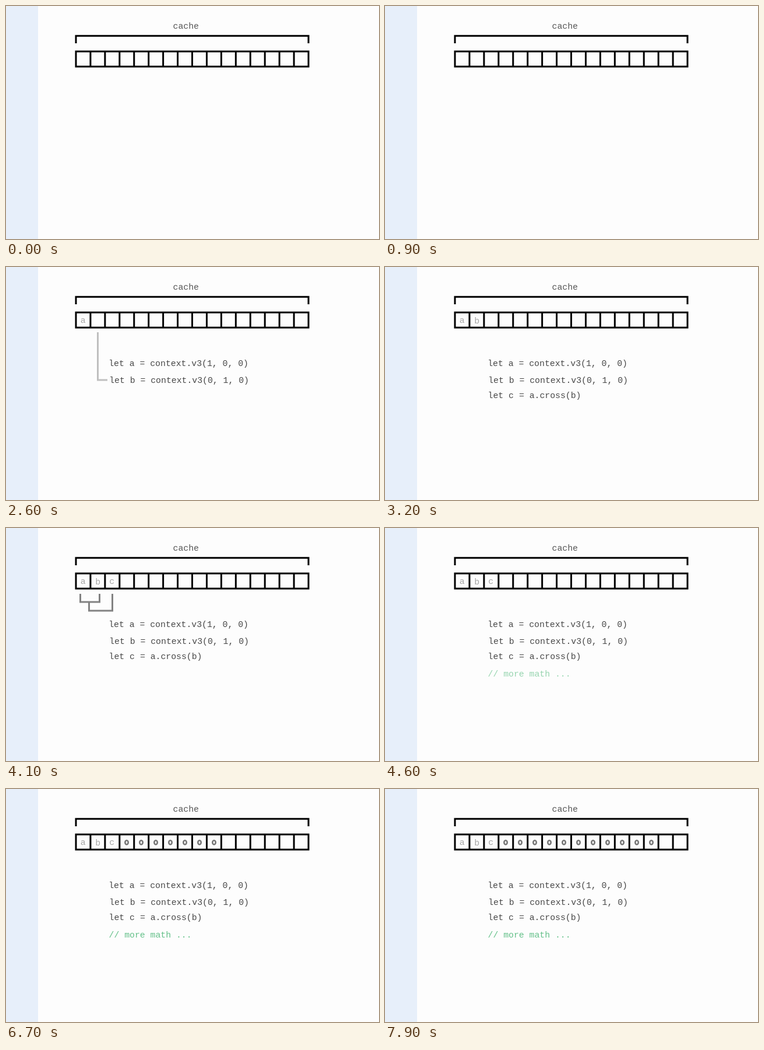
Write an HTML page with a canvas that moves like this. It is 640 by 400 pixels and loops after 8000 ms.

```html
<!DOCTYPE html>
<html lang="en">
<head>
<meta charset="utf-8">
<title>Cache</title>
<style>
  html, body { margin: 0; width: 100%; height: 100%; overflow: hidden; background: #fdfdfd; }
  canvas { display: block; }
</style>
</head>
<body>
<canvas id="stage" width="640" height="400"></canvas>
<script>
const ctx = document.getElementById('stage').getContext('2d');
const LOOP = 8000, LEFT = 120, RIGHT = 519, CELLS = 16;
const INK = '#000', TEXT = '#484848', LETTER = '#a6a6a6', ENTRY = '#777',
      WIRE = '#828282', GREEN = '#62c088';

const clamp = v => Math.max(0, Math.min(1, v));
const fadeIn = (t, start, time = 300) => clamp((t - start) / time);
const pulse = (t, start, end) => fadeIn(t, start) * (1 - fadeIn(t, end, 200));

function text(str, x, y, color, alpha = 1) {
  ctx.globalAlpha = alpha;
  ctx.fillStyle = color;
  ctx.fillText(str, x, y);
  ctx.globalAlpha = 1;
}

// Each path is a flat list of x, y pairs.
function lines(color, alpha, ...paths) {
  ctx.globalAlpha = alpha;
  ctx.strokeStyle = color;
  ctx.lineWidth = 3;
  ctx.beginPath();
  for (const p of paths)
    for (let i = 0; i < p.length; i += 2)
      i ? ctx.lineTo(p[i], p[i + 1]) : ctx.moveTo(p[i], p[i + 1]);
  ctx.stroke();
  ctx.globalAlpha = 1;
}

function drawCache() {
  text('cache', 286.5, 39, '#555');
  lines(INK, 1, [LEFT, 64, LEFT, 51.2, RIGHT, 51.2, RIGHT, 64]);
  ctx.strokeRect(LEFT, 78, RIGHT - LEFT, 26);
  for (let i = 1; i < CELLS; i++) {
    const x = LEFT + i * (RIGHT - LEFT) / CELLS;
    lines(INK, 1, [x, 78, x, 104]);
  }
}

function drawEntry(i) {
  ctx.strokeStyle = ENTRY;
  ctx.lineWidth = 2.6;
  ctx.beginPath();
  ctx.ellipse(207 + i * 25, 91.8, 2.7, 3.5, 0, 0, Math.PI * 2);
  ctx.stroke();
}

function draw(t) {
  ctx.fillStyle = '#fdfdfd';
  ctx.fillRect(0, 0, 640, 400);
  ctx.fillStyle = '#e7effa';
  ctx.fillRect(0, 0, 55, 400);
  ctx.font = '14.8px "Liberation Mono", monospace';
  drawCache();

  text('let a = context.v3(1, 0, 0)', 176.2, 170, TEXT, fadeIn(t, 1000));
  text('let b = context.v3(0, 1, 0)', 177.2, 199, TEXT, fadeIn(t, 2200));
  text('let c = a.cross(b)', 176.6, 225, TEXT, fadeIn(t, 2900));
  text('// more math ...', 176.5, 255, GREEN, fadeIn(t, 4400));

  lines(WIRE, pulse(t, 1500, 2200), [132.5, 112, 132.5, 165.5, 173, 165.5]);
  lines(WIRE, pulse(t, 2450, 2950), [157.5, 112, 157.5, 194, 174, 194]);
  lines(WIRE, pulse(t, 3300, 4200),
    [127.5, 113, 127.5, 127, 160.5, 127, 160.5, 113],
    [142.5, 127, 142.5, 142, 182.5, 142, 182.5, 113]);

  text('a', 127.7, 96, LETTER, fadeIn(t, 1800));
  text('b', 153.3, 97, LETTER, fadeIn(t, 2650));
  text('c', 177.2, 96, LETTER, fadeIn(t, 3700));

  if (t >= 4950) drawEntry(0);
  for (let i = 1; i <= 10; i++)
    if (t >= 5200 + i * 250) drawEntry(i);
}

function frame() {
  draw(performance.now() % LOOP);
  requestAnimationFrame(frame);
}
frame();
</script>
</body>
</html>
```
